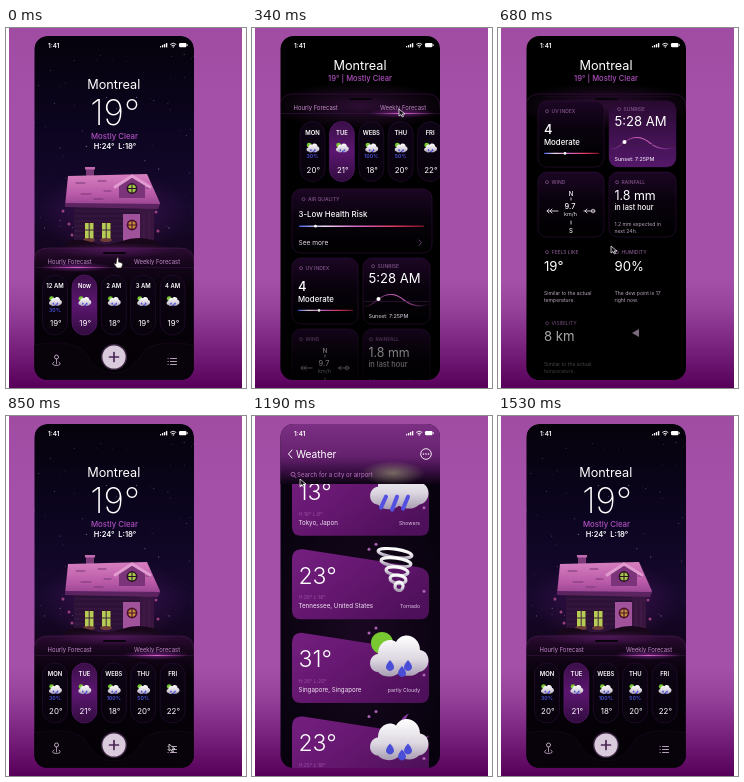
Animation of 240x360 px, one loop 1700 ms. Source, as an HTML page:

```html
<!DOCTYPE html>
<html lang="en">
<head>
<meta charset="utf-8">
<title>Weather app</title>
<style>
  html, body { margin: 0; width: 100%; height: 100%; overflow: hidden; background: #fff; }
  svg { display: block; width: 100%; height: 100%; }
  text { font-family: Inter, sans-serif; white-space: pre; }
</style>
</head>
<body>
<svg id="stage" viewBox="0 0 240 360"></svg>
<script>
const STEP = 170;
const stage = document.getElementById('stage');

const rect = (x, y, w, h, fill, r = 0, extra = '') =>
  `<rect x="${x}" y="${y}" width="${w}" height="${h}" rx="${r}" fill="${fill}" ${extra}/>`;
const circle = (x, y, r, fill, extra = '') =>
  `<circle cx="${x}" cy="${y}" r="${r}" fill="${fill}" ${extra}/>`;
const ellipse = (x, y, rx, ry, fill, extra = '') =>
  `<ellipse cx="${x}" cy="${y}" rx="${rx}" ry="${ry}" fill="${fill}" ${extra}/>`;
const path = (d, fill, extra = '') => `<path d="${d}" fill="${fill}" ${extra}/>`;
const line = (d, color, w = 1, extra = '') =>
  path(d, 'none', `stroke="${color}" stroke-width="${w}" stroke-linecap="round" ${extra}`);
const text = (s, x, y, size, fill = '#fff', weight = 400, anchor = 'start') =>
  `<text x="${x}" y="${y}" font-size="${size}" fill="${fill}" font-weight="${weight}" text-anchor="${anchor}">${s}</text>`;
const mid = (s, x, y, size, fill, weight) => text(s, x, y, size, fill, weight, 'middle');
const at = (x, y, body, scale = 1) => `<g transform="translate(${x} ${y}) scale(${scale})">${body}</g>`;
const group = (id, body, extra = '') => `<g id="${id}" ${extra}>${body}</g>`;
const clipped = (clip, body) => `<g clip-path="url(#${clip})">${body}</g>`;

const gradient = (id, stops, dir = 'x1="0" y1="0" x2="0" y2="1"') =>
  `<linearGradient id="${id}" ${dir}>${stops.map(([o, c, a = 1]) =>
    `<stop offset="${o}" stop-color="${c}" stop-opacity="${a}"/>`).join('')}</linearGradient>`;
const glow = (id, color, a) =>
  `<radialGradient id="${id}"><stop stop-color="${color}" stop-opacity="${a}"/>` +
  `<stop offset="1" stop-color="${color}" stop-opacity="0"/></radialGradient>`;

function seeded(seed) {
  return () => (seed = (seed * 16807) % 2147483647) / 2147483647;
}

const defs = `<defs>
  ${gradient('wall', [[0, '#a04ca3'], [.2, '#a550a8'], [.7, '#a550a8'], [.78, '#96419a'], [.88, '#7a2480'], [1, '#560059']])}
  ${gradient('night', [[0, '#05020b'], [.3, '#0d0522'], [.5, '#17082d'], [.64, '#12051c'], [1, '#030005']])}
  ${gradient('sheet', [[0, '#2a0b30'], [.12, '#16051b'], [.3, '#07020a'], [1, '#030005']])}
  ${gradient('pill', [[0, '#0d0414'], [1, '#07020b']])}
  ${gradient('pillOn', [[0, '#3a0f48'], [.5, '#5c1670'], [1, '#300c3e']])}
  ${gradient('tile', [[0, '#1c0624'], [.45, '#08020c'], [1, '#000']])}
  ${gradient('lit', [[0, '#280a30'], [1, '#54186a']])}
  ${gradient('city', [[0, '#741f80'], [.5, '#65176f'], [1, '#4e105a']], 'x1="0" y1="0" x2="1" y2=".7"')}
  ${gradient('header', [[0, '#7c3084'], [.55, '#64206d'], [.8, '#360d40'], [1, '#0c0312']])}
  ${gradient('roof', [[0, '#d77fc0'], [.6, '#b95aa8'], [1, '#8f3e8c']])}
  ${gradient('scale', [[0, '#4660e0'], [.2, '#f2dcf4'], [.45, '#d468c8'], [.75, '#e03a60'], [1, '#7a1028']], 'x1="0" y1="0" x2="1" y2="0"')}
  ${gradient('cloud', [[0, '#fff'], [.6, '#dcd6e0'], [1, '#a79cb2']])}
  ${gradient('edge', [[0, '#d050d0', 0], [.5, '#e070c8'], [1, '#d050d0', 0]], 'x1="0" y1="0" x2="1" y2="0"')}
  ${gradient('fade', [[0, '#000', 0], [1, '#000', .75]])}
  ${glow('violet', '#8a2a9c', .65)}
  ${glow('olive', '#a3a67c', .6)}
  <clipPath id="phone">${rect(28.5, 8, 159.5, 344, '#000', 13, 'id="corners"')}</clipPath>
  <clipPath id="page">${rect(28, 8, 160, 344, '#000', 13)}</clipPath>
  <clipPath id="below">${rect(28, 68, 160, 284, '#000')}</clipPath>
</defs>`;

const status = text('1:41', 42, 19.5, 6.4, '#fff', 600) +
  [0, 1, 2, 3].map(i => rect(154 + i * 2, 18 - i, 1.3, 1.5 + i, '#fff', .4)).join('') +
  line('M164.5 16.2q2.7-2.2 5.4 0M165.7 17.7q1.5-1.1 3 0', '#fff', .9) +
  circle(167.2, 19, .7, '#fff') +
  rect(173, 15, 7.5, 4.2, '#fff', 1.2) + rect(181, 16.3, .7, 1.6, '#fff');

const puff = path('M-21 18C-32 17-31 1-21 0C-21-12-10-17-3-12C4-24 21-18 21-4C32-3 33 16 20 18C14 24 5 22 0 19C-6 24-16 24-21 18z', 'url(#cloud)');
const drop = (x, y) => path(`M${x} ${y}q8 9 0 11q-8-2 0-11z`, '#4a4ed6');
const rain = puff + drop(-9, 6) + drop(3, 12) + drop(9, 6);
const sunRain = circle(-17, -11, 11, '#78c832') + rain;
const moonRain = path('M10-24a16 16 0 1 0 20 22a15 15 0 0 1-20-22z', '#8a3aa0') + rain;
const storm = puff + line('M-13 10l-5 11M-2 10l-5 13M9 10l-5 12', '#5450e0', 4);
const twister = [[17, -17], [15, -8], [11, 1], [8, 9], [4, 16]].map(([r, y], i) =>
  ellipse(i - 4, y, r, 4.2, 'none',
    `stroke="url(#cloud)" stroke-width="3.2" transform="rotate(8 ${i - 4} ${y})"`)).join('');

function strip(id, days) {
  return group(id, days.map(([name, chance, temp], i) => {
    const x = 49 + i * 29.4, on = i === 1;
    return rect(x - 12.5, 247, 25, 60, on ? 'url(#pillOn)' : 'url(#pill)', 12.5,
        `stroke="${on ? '#64187a' : '#2b1038'}" stroke-width=".6"`) +
      mid(name, x, 260.3, 5.9, '#fff', 600) +
      at(x + .4, 273, sunRain, .22) +
      mid(chance, x, 283.5, 5.2, '#4a55d8', 600) +
      mid(temp, x + .8, 298.3, 7.9);
  }).join(''));
}
const hours = [['12 AM', '30%', '19°'], ['Now', '', '19°'], ['2 AM', '', '18°'], ['3 AM', '', '19°'], ['4 AM', '', '19°']];
const week = [['MON', '30%', '20°'], ['TUE', '', '21°'], ['WEBS', '100%', '18°'], ['THU', '50%', '20°'], ['FRI', '', '22°']];

const tabs = (id) => text('Hourly Forecast', 41.5, 236, 5.9, '#c58ccc') +
  text('Weekly Forecast', 128, 236, 5.9, '#c58ccc') +
  line('M28 239.5H188', '#3b1444', .5) +
  group(id + 'HourEdge', ellipse(70, 239, 36, 5, 'url(#violet)') + rect(36, 239, 70, .9, 'url(#edge)')) +
  group(id + 'WeekEdge', ellipse(150, 239, 34, 5, 'url(#violet)') + rect(120, 239, 62, .9, 'url(#edge)'));

function sky() {
  const rnd = seeded(41);
  let dots = '';
  for (let i = 0; i < 75; i++)
    dots += circle((28 + rnd() * 160).toFixed(1), (24 + rnd() * 180).toFixed(1), (.2 + rnd() * .4).toFixed(2),
      '#b49ad0', `opacity="${(.25 + rnd() * .6).toFixed(2)}"`);
  return rect(28, 8, 160, 344, 'url(#night)') + dots;
}

const pane = x => rect(x, 194, 10.5, 18, '#35102b', 1) + rect(x + 1, 195, 8.5, 16, '#b6cd55') +
  line(`M${x + 5.2} 195v16M${x + 1} 202h8.5`, '#40203a', 1) +
  ellipse(x + 5, 212, 6, 2, '#6d3c38');
const house = ellipse(108, 185, 76, 42, 'url(#violet)', 'opacity=".5"') +
  path('M68 174H148V216H68z', '#2d1238') +
  line('M69 183H147M69 188H147M69 193H147M69 198H147M69 203H147M69 208H147', '#461d50', .5) +
  path('M117 186H134V216H117z', '#a0529b') +
  path('M134 181H148V216H134z', '#39163f') +
  line('M138 186v28M143 184v30', '#55245c', .6) +
  pane(78) + pane(95) +
  rect(80, 140, 8, 10, '#7d3a7b') + rect(79, 139, 10, 2.5, '#c06aaf') +
  path('M62 148L141 146L154 175L152 180L59 178z', 'url(#roof)') +
  path('M59 175L154 176L152 181L59 179z', '#5b2460') +
  line('M70 155h9M92 153h8M75 166h10M98 163h7M140 160h4M88 171h9', '#7a3778', 1) +
  path('M113 170V157L126 148L139 157V170z', '#7b3479') +
  line('M109 159L126 148L144 159', '#e29bd0', 3) +
  circle(126, 160.5, 5.4, '#2b1127') + circle(126, 160.5, 3.9, '#a5c74a') +
  line('M126 156v9M121.5 160.5h9', '#2b1127', 1) +
  circle(126, 197, 5.4, '#4c102e') + circle(126, 197, 3.7, '#c7903c') +
  line('M126 192.5v9M121.5 197h9', '#4c102e', 1.1) +
  path('M60 215Q70 209 85 214T116 213T150 213L156 222H58z', '#170718') +
  [[57, 183], [63, 196], [150, 184], [66, 207], [152, 203]].map(([x, y]) => circle(x, y, 1.5, '#98407e')).join('');

const home = sky() + status +
  mid('Montreal', 107.8, 61, 12.7) + mid('19°', 109, 96.5, 35, '#fff', 200) +
  mid('Mostly Clear', 108.5, 111, 7.8, '#b04fc0', 500) +
  mid('H:24°  L:18°', 109, 120.5, 7.5, '#fff', 600) + house +
  path('M28 352V234Q28 220 42 220H174Q188 220 188 234V352z', 'url(#sheet)', 'stroke="#53205c" stroke-width=".5"') +
  ellipse(108, 222, 62, 8, 'url(#violet)', 'opacity=".55"') +
  rect(97, 224, 23, 2, '#09030c', 1) + tabs('home') +
  strip('homeHours', hours) + strip('homeWeek', week) +
  path('M28 317Q65 311 78 323Q90 345 108 345T138 323Q151 311 188 317V352H28z', '#08020b', 'stroke="#200c26" stroke-width=".5"') +
  circle(108, 329, 13, '#3e2744') + circle(108, 329, 11.6, '#d9cbdc') +
  line('M103.5 329h9M108 324.5v9', '#4b2754', 1.7) +
  circle(50.5, 329, 2, 'none', 'stroke="#cab4cf" stroke-width=".9"') +
  line('M50.5 331v5M48 334q-4 3 2.5 3.5q6-.5 2.5-3.5', '#cab4cf', .8) +
  line('M164.5 330.5h6M164.5 333.5h6M164.5 336.5h6M162 330.5h.2M162 333.5h.2M162 336.5h.2', '#cab4cf', .9);

const tile = (x, y, w, h) => rect(x, y, w, h, 'url(#tile)', 9, 'stroke="#2c0f36" stroke-width=".7"');
const head = (s, x, y) => circle(x, y - 1.8, 1.5, 'none', 'stroke="#83558c" stroke-width=".7"') + text(s, x + 4.5, y, 5, '#83558c', 500);
const note = (a, b, x, y) => text(a, x, y, 5.1, '#b9a6be') + text(b, x, y + 7, 5.1, '#b9a6be');

const cards =
  tile(40, 161, 140, 64) + head('AIR QUALITY', 51.5, 173) +
  text('3-Low Health Risk', 46.5, 189, 7.9, '#fff', 500) +
  rect(47, 197.6, 125, 1.3, 'url(#scale)', .6) + circle(63.5, 198.2, 1.4, '#fff') +
  text('See more', 46.5, 217, 6.6, '#e8dcea') + line('M167 212l2.5 2.7l-2.5 2.7', '#75557c', .8) +
  tile(40, 230, 66, 66) + head('UV INDEX', 49, 242) +
  text('4', 46, 263, 13, '#fff', 500) + text('Moderate', 46, 273.5, 7.8, '#fff', 500) +
  rect(46, 281.7, 55, 1.4, 'url(#scale)', .7) + circle(67, 282.4, 1.3, '#fff') +
  tile(111, 230, 67, 66) + group('sunlight', rect(111, 230, 67, 66, 'url(#lit)', 9)) +
  head('SUNRISE', 121, 240) + text('5:28 AM', 116.5, 254.5, 13.1) +
  line('M111 278Q118 279 125 272Q139 261 152 272Q163 281 178 276', 'url(#edge)', 1.2) +
  line('M112 273.5H177', '#3f1a48', .6) + circle(126.5, 271, 2, '#fff') +
  text('Sunset: 7:25PM', 116.5, 290, 5.3, '#eadded', 500) +
  tile(40, 301, 66, 65) + head('WIND', 49, 313) +
  mid('N', 73, 325, 6, '#fff', 500) + mid('9.7', 72, 338, 7.4, '#fff', 500) +
  mid('km/h', 72.5, 345, 5.4, '#ddd') + mid('S', 73, 361.5, 6, '#fff', 500) +
  line('M73 327v2M73 350v3M49 340h11M51 338l-2 2l2 2M54 338l-2 2l2 2M86 340h11M89 338l-2 2l2 2', '#e0d2e4', .9) +
  circle(95, 340, 1.8, 'none', 'stroke="#e0d2e4" stroke-width=".8"') +
  tile(111, 301, 67, 65) + head('RAINFALL', 119, 313) +
  text('1.8 mm', 116.5, 329, 12.4) + text('in last hour', 116.5, 339, 7.4, '#fff', 500) +
  note('1.2 mm expected in', 'next 24h.', 116.5, 355) +
  head('FEELS LIKE', 49, 383) + text('19°', 46, 399.5, 13.2) +
  note('Similar to the actual', 'temperature.', 46, 424) +
  head('HUMIDITY', 119, 383) + text('90%', 116.5, 399.5, 13.2) +
  note('The dew point is 17', 'right now.', 116.5, 424) +
  head('VISIBILITY', 49, 454) + text('8 km', 46, 470, 13.2) +
  note('Similar to the actual', 'temperature.', 46, 495) +
  path('M134 462l7-4v8z', '#b49aba');

const detail = rect(28, 8, 160, 344, '#000') +
  ellipse(108, 78, 92, 24, 'url(#violet)', 'opacity=".5"') + status +
  mid('Montreal', 108, 42, 12.7) + mid('19° | Mostly Clear', 108, 53, 7.6, '#b04fc0', 500) +
  line('M28 81V79Q28 66 42 66H174Q188 66 188 79V81', '#3c1444', .6) +
  rect(97, 70, 23, 2, '#09030c', 1) +
  clipped('below', group('scroll', at(0, -154, tabs('detail')) +
    at(11.5, -153.5, strip('detailHours', hours) + strip('detailWeek', week)) + cards)) +
  rect(28, 270, 160, 82, 'url(#fade)');

const places = [
  ['19°', 'H:24° L:18°', 'Montreal, Canada', 'Mostly Clear', moonRain],
  ['20°', 'H:21° L:12°', 'Toronto, Canada', 'Cloudy', rain],
  ['13°', 'H:16° L:8°', 'Tokyo, Japon', 'Showers', storm],
  ['23°', 'H:26° L:16°', 'Tennessee, United States', 'Tornado', twister],
  ['31°', 'H:28° L:20°', 'Singapore, Singapore', 'partly Cloudy', sunRain],
  ['23°', 'H:25° L:18°', 'Lisbon, Portugal', 'Mid Rain', moonRain]
];
const city = ([temp, range, name, sky, icon], i) => at(0, i * 83.6,
  path('M40 92Q40 81 51 82L167 100Q177 102 177 111V143Q177 152 168 152H49Q40 152 40 143z', 'url(#city)') +
  text(temp, 46.5, 116.5, 23, '#fff', 300) + text(range, 46.5, 132, 5.1, '#9a4fa4') +
  text(name, 46.5, 141, 6.2, '#f0e4f2') + text(sky, 168, 141, 5.1, '#e1cce5', 400, 'end') +
  at(147, 103, icon) + [[117, 82], [124, 77], [172, 124]].map(([x, y]) => circle(x, y, 1.5, '#ad62b5')).join(''));

const list = rect(28, 8, 160, 344, '#07020d') +
  ellipse(108, 215, 100, 165, 'url(#violet)', 'opacity=".22"') +
  clipped('below', group('cityScroll', places.map(city).join(''))) +
  rect(28, 8, 160, 60, 'url(#header)') + ellipse(141, 57, 32, 12, 'url(#olive)') + status +
  line('M40 34l-3.5 4l3.5 4', '#fff', 1) + text('Weather', 44, 41.8, 10.2) +
  circle(174, 38, 5.3, 'none', 'stroke="#fff" stroke-width=".9"') +
  [171.5, 174, 176.5].map(x => circle(x, 38, .8, '#fff')).join('') +
  circle(41, 58.3, 2, 'none', 'stroke="#bb72c4" stroke-width=".8"') + line('M42.5 60l1.5 1.7', '#bb72c4', .8) +
  text('Search for a city or airport', 45, 61, 6.1, '#bb72c4');

const hand = path('M-1-4q1-1 1.5.5V0l3.5 1q1 1 .2 3L3 6H-1L-4 2q0-1.5 2 0z', '#fff', 'stroke="#221" stroke-width=".6"');
const arrow = path('M-2-3V4L0 2.5L1.3 5L2.5 4.5L1.3 2H4z', '#17121a', 'stroke="#fff" stroke-width=".7"');

stage.innerHTML = defs + rect(3, 0, 233, 360, 'url(#wall)') +
  clipped('phone', group('list', list) + group('home', clipped('page', home)) + group('detail', detail)) +
  group('hand', hand) + group('arrow', arrow);

const parts = {};
stage.querySelectorAll('[id]').forEach(el => { parts[el.id] = el; });
const show = (id, on) => parts[id].setAttribute('display', on ? 'inline' : 'none');
const move = (id, x, y = 0) => parts[id].setAttribute('transform', `translate(${x} ${y})`);

// One pose per step: home and list hold a sideways offset, detail its scroll.
const poses = [
  { home: 0, hourly: true, hand: [112, 234] },
  { detail: 0, hourly: true, arrow: [124, 88] },
  { detail: 0, arrow: [149, 84] },
  { detail: -92, arrow: [126, 172] },
  { detail: -157, arrow: [115, 221] },
  { home: 0, arrow: [165, 331] },
  { home: -8.5, list: 126, slide: true, top: true },
  { list: 0, arrow: [50, 66] },
  { list: -16, home: 89, slide: true, arrow: [39, 43] },
  { home: 0 }
];
const LAST_SCROLL = -157;

function render(p) {
  ['home', 'list', 'detail'].forEach(id => show(id, id in p));
  move('home', p.home || 0);
  move('list', p.list || 0);
  move('scroll', 0, p.detail || 0);
  move('cityScroll', 0, p.top ? 0 : -199.5);
  parts.sunlight.setAttribute('opacity', (p.detail || 0) / LAST_SCROLL);
  ['home', 'detail'].forEach(id => {
    show(id + 'Hours', p.hourly);
    show(id + 'HourEdge', p.hourly);
    show(id + 'Week', !p.hourly);
    show(id + 'WeekEdge', !p.hourly);
  });
  parts.corners.setAttribute('rx', p.slide ? 0 : 13);
  // The page sliding in or out lies on top.
  const front = p.top ? parts.list : parts.home;
  if (front.parentNode.lastChild !== front) front.parentNode.append(front);
  ['hand', 'arrow'].forEach(id => {
    show(id, p[id]);
    if (p[id]) move(id, ...p[id]);
  });
}

const start = performance.now();
let current = -1;
function tick() {
  const index = Math.floor((performance.now() - start) / STEP) % poses.length;
  if (index !== current) render(poses[current = index]);
  requestAnimationFrame(tick);
}
tick();
</script>
</body>
</html>
```
